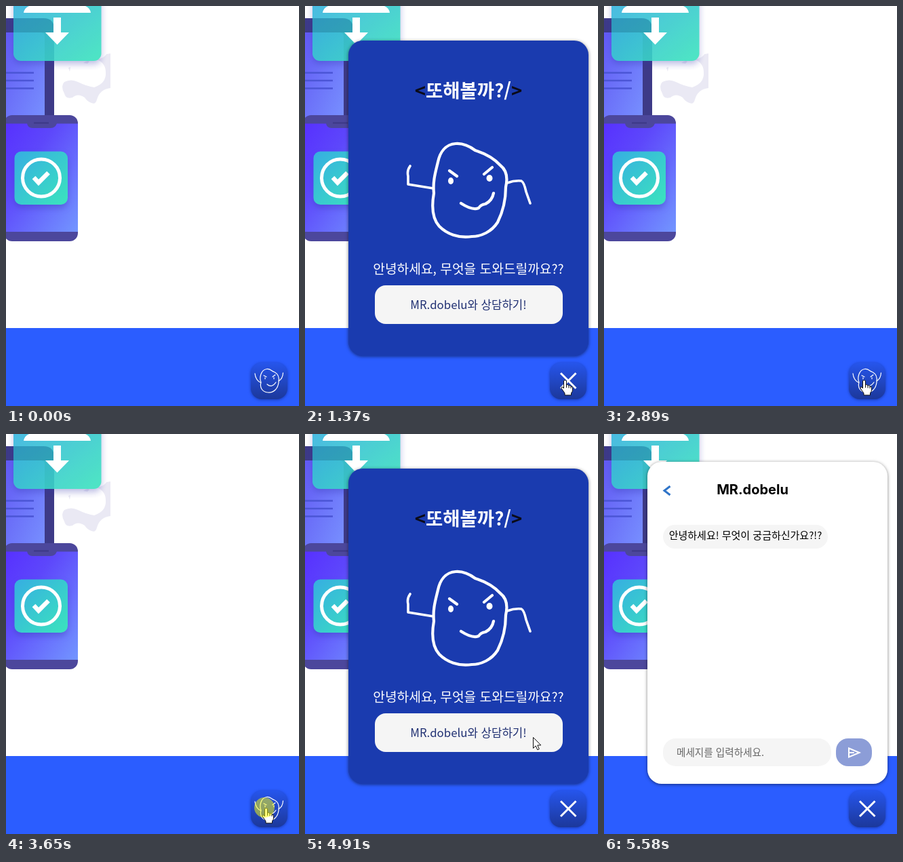
An HTML page that plays this animation: 432 px wide and 590 px high, repeating every 6330 ms.

```html
<!DOCTYPE html>
<html lang="ko">
<head>
<meta charset="utf-8">
<title>Chat widget</title>
<style>
  html, body { margin: 0; width: 100%; height: 100%; overflow: hidden; background: #fff; }
  svg { display: block; }
  text { font-family: "Noto Sans CJK KR", "Noto Sans CJK", "Noto Sans", sans-serif; }
  .mid { text-anchor: middle; }
  .line { fill: none; stroke: #fff; stroke-linecap: round; stroke-linejoin: round; }
  .panel { filter: drop-shadow(0 1px 2.5px rgba(0, 0, 0, .5)); }
  .soft { filter: drop-shadow(0 5px 5px rgba(50, 50, 170, .35)); }
  .cursor { fill: #fff; stroke: #111; stroke-width: 1; stroke-linejoin: round; }
</style>
</head>
<body>
<svg width="432" height="590" viewBox="0 0 432 590">
  <defs>
    <linearGradient id="laptop" x2="1" y2="1">
      <stop stop-color="#6259f4"/><stop offset="1" stop-color="#7891ff"/>
    </linearGradient>
    <linearGradient id="phone" x2="1" y2="1">
      <stop stop-color="#5730ff"/><stop offset=".35" stop-color="#5d47fb"/><stop offset="1" stop-color="#7396ff"/>
    </linearGradient>
    <linearGradient id="teal" x2="1" y2="1">
      <stop stop-color="#36aee2"/><stop offset="1" stop-color="#3be4bd"/>
    </linearGradient>
    <linearGradient id="launch" x2="0" y2="1">
      <stop stop-color="#2655ec"/><stop offset="1" stop-color="#1c389b"/>
    </linearGradient>
    <clipPath id="phoneShape"><rect x="-3" y="161" width="109" height="186" rx="12"/></clipPath>
  </defs>

  <!-- Page -->
  <path fill="#2b5dff" d="M0 475H432V590H0z"/>
  <path fill="#eae9f4" d="M154 70V121Q138 123 134 138 132 146 126 143 120 141 116 135 106 128 98 135 88 138 86 129 80 118 86 112 96 107 106 112 118 118 130 120 148 114 147 98 147 84 134 79 146 76 148 71z"/>
  <path fill="#eae9f4" d="M92 91l3-1-1 7zM114 84q6-5 9-2l-3 3z"/>
  <path fill="#3d3a87" d="M0 18H55Q71 18 71 34V170H0z"/>
  <path fill="url(#laptop)" d="M0 39H51Q57 39 57 45V170H0z"/>
  <path stroke="#4b55d6" stroke-width="2.6" d="M0 98.5H41M0 110H41M0 121.5H41"/>
  <rect class="soft" x="11" y="-20" width="129.500" height="101" rx="11" fill="url(#teal)" opacity=".9"/>
  <path fill="#1f6d92" opacity=".33" d="M11 18H55Q71 18 71 34V39H11z"/>
  <path fill="#fff" d="M26 10Q27 3 34 0V-5H117V0Q124 3 125 10zM70 17H81V39H93L75.500 57 58 39H70z"/>
  <g clip-path="url(#phoneShape)">
    <path fill="#4c479c" d="M-3 161H106V347H-3z"/>
    <path fill="url(#phone)" d="M-3 173.500H106V333H-3z"/>
    <path fill="#4c479c" d="M29 173H75Q73 180 66 180H39Q32 180 31 173z"/>
    <path stroke="#3c3987" stroke-width="2" d="M41 172.500H63"/>
  </g>
  <rect class="soft" x="12.500" y="214.500" width="78.500" height="78.500" rx="10" fill="url(#teal)"/>
  <circle cx="52" cy="253.500" r="27.500" class="line" stroke-width="5"/>
  <path fill="none" stroke="#fff" stroke-width="6.500" d="M41 253L48 260.500 62.500 246"/>

  <!-- Launcher -->
  <rect x="361" y="526" width="54" height="54" rx="16" fill="url(#launch)" style="filter:drop-shadow(0 1px 2px rgba(10,30,110,.55))"/>
  <g id="mascot" class="line" stroke-width="1.200">
    <path d="M384 535.500C390 534 391 539 396 540 402 543 403 549 402 555 401 564 395 571 386 570 377 569 374 562 376 555 373 548 376 537 384 535.500z"/>
    <path d="M367 542Q368 552 375.500 555.500M402 553Q408 550 408.500 541M380 545l4 2M397 544l-4 3M382 548v2M395 548v2M385 558Q392 564 398 555"/>
  </g>
  <path id="close" class="line" style="stroke-linecap:butt" stroke-width="3" d="M377 541.500L399.500 564M399.500 541.500L377 564"/>

  <!-- Welcome panel -->
  <g id="welcome">
    <rect class="panel" x="64" y="51" width="354" height="465" rx="21" fill="#1a3baf"/>
    <text class="mid" x="241" y="135" font-size="27.500" font-weight="900" fill="#fff"><tspan fill="#0b0b18">&lt;</tspan>또해볼까?/<tspan fill="#0b0b18">&gt;</tspan></text>
    <g class="line" stroke-width="4.200">
      <path d="M222 203C234 202 243 207 251 213 264 217 278 224 288 235 297 242 299 254 296 267 296 287 291 305 284 319 275 333 260 340 246 340 226 343 209 336 198 325 187 313 187 293 190 276 188 258 193 243 196 230 199 216 207 204 222 203z"/>
      <path stroke-width="3.600" d="M155 236Q150 243 152 251V263L189 269M298 261Q309 257 319 258 323 260 326 274L332 291"/>
      <path d="M213 243L224 251M276 238L264 248M230 291Q247 302 256 298 259 293 266 292 276 287 278 276"/>
    </g>
    <ellipse cx="215" cy="258" rx="4" ry="5" fill="#fff"/>
    <ellipse cx="272" cy="254" rx="4.500" ry="5" fill="#fff"/>
    <text class="mid" x="241" y="395" font-size="19.200" font-weight="300" fill="#fff">안녕하세요, 무엇을 도와드릴까요??</text>
    <rect x="103" y="412" width="277" height="57" rx="16" fill="#f5f5f5"/>
    <text class="mid" x="241" y="447" font-size="16.800" font-weight="300" fill="#1f2f72">MR.dobelu와 상담하기!</text>
  </g>

  <!-- Chat panel -->
  <g id="chat">
    <rect class="panel" x="64" y="41" width="354" height="475" rx="21" fill="#fff"/>
    <path fill="none" stroke="#2f74c8" stroke-width="3" d="M97.500 77L89 83.500 97.500 90"/>
    <text class="mid" x="219" y="89" font-size="20" font-weight="700" style="font-family:Inter,sans-serif">MR.dobelu</text>
    <rect x="87" y="134" width="243" height="35" rx="17.500" fill="#f5f5f5"/>
    <text class="mid" x="208.500" y="155" font-size="15" font-weight="500">안녕하세요! 무엇이 궁금하신가요?!?</text>
    <rect x="87" y="449" width="248" height="41" rx="19" fill="#f5f5f5"/>
    <text x="107" y="475" font-size="14.600" font-weight="300" fill="#666">메세지를 입력하세요.</text>
    <rect x="342" y="449" width="53" height="41" rx="18" fill="#8c9dd7"/>
    <path class="line" style="stroke-linejoin:miter" stroke-width="2" d="M361 463.500L376.500 470 361 476.500zM361 470H368"/>
  </g>

  <!-- Pointer -->
  <g id="pointer">
    <path id="arrow" class="cursor" d="M.5 .5V16.500L4.200 13 6.800 18.800 9.300 17.700 6.800 12H11.800z"/>
    <g id="hand" class="cursor">
      <path d="M-1.500 1Q.5-1.500 2.500 1V7Q4.500 5.500 6 8 8 6.500 9 9 12 8.500 11.500 12 12 17 9.500 19V22H0V19L-5 12Q-5.500 9.500-3 10L-1.500 12z"/>
      <path fill="none" d="M2.500 7V11M6 8V11.500M9 9V12"/>
    </g>
  </g>
  <circle id="press" r="15" fill="#ff0" opacity=".5"/>
</svg>
<script>
const LOOP = 6330, TICK = 66.6;
const BUTTON = [383, 552], OPTION = [336, 447];
const el = id => document.getElementById(id);
const show = (id, on) => el(id).style.display = on ? '' : 'none';
const within = (t, a, b) => t >= a && t < b;
const easeOut = p => p * (2 - p);
const easeInOut = p => p * p * (3 - 2 * p);

function progress(t, start, ticks, ease) {
  const p = Math.floor((t - start) / TICK) / ticks;
  return ease(Math.max(0, Math.min(1, p)));
}
const along = (a, via, b, p) => a.map((v, i) =>
  (1 - p) ** 2 * v + 2 * p * (1 - p) * via[i] + p * p * b[i]);

function pointerAt(t) {
  if (t < 3780) return along([390, 583], [387, 566], BUTTON, progress(t, 300, 6, easeOut));
  if (t < 4910) return along(BUTTON, [366, 496], OPTION, progress(t, 3780, 7, easeInOut));
  return along(OPTION, [391, 508], [405, 586], progress(t, 4910, 9, easeInOut));
}

function draw(t) {
  const chat = t >= 4980;
  const open = within(t, 1370, 2890) || t >= 3780;
  const [x, y] = pointerAt(t);
  const overButton = x > 361 && x < 415 && y > 526 && y < 580;
  show('welcome', open && !chat);
  show('chat', chat);
  show('mascot', !open);
  show('close', open);
  show('pointer', within(t, 300, 5580));
  show('hand', overButton);
  show('arrow', !overButton);
  el('pointer').setAttribute('transform', `translate(${Math.round(x)} ${Math.round(y)})`);
  const pressed = [[1230, 1370], [2760, 2890], [3650, 3780], [4850, 4910]];
  show('press', pressed.some(([a, b]) => within(t, a, b)));
  el('press').setAttribute('cx', x - (overButton ? 2 : 0));
  el('press').setAttribute('cy', y - (overButton ? 1 : 0));
}

function frame() {
  draw(performance.now() % LOOP);
  requestAnimationFrame(frame);
}
frame();
</script>
</body>
</html>
```
